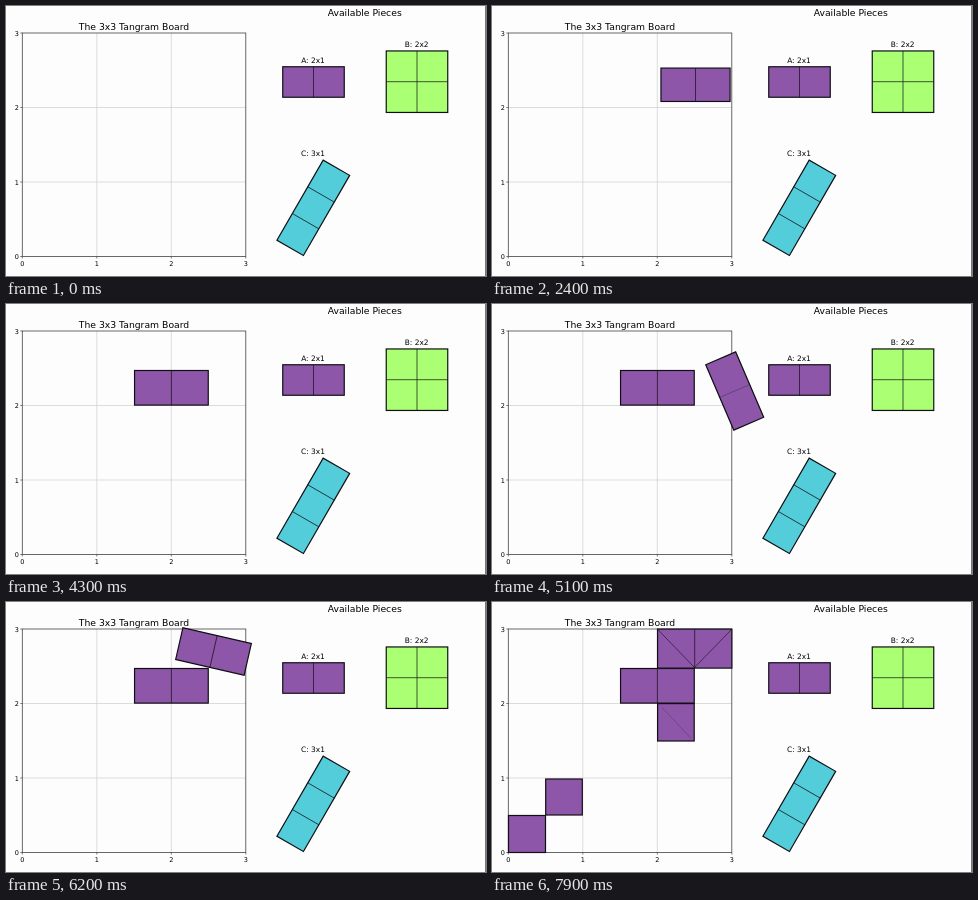
These frames come from a looping animation (480 px wide and 270 px high, 8 s). An HTML page:

```html
<!DOCTYPE html>
<html lang="en">
<head>
<meta charset="utf-8">
<title>Tangram board</title>
<style>
html, body { margin: 0; width: 100%; height: 100%; overflow: hidden; background: #fdfdfd; }
svg { display: block; width: 100vw; height: 100vh; }
text { font-family: "DejaVu Sans", sans-serif; fill: #000; text-anchor: middle; }
</style>
</head>
<body>
<svg id="stage" viewBox="0 0 480 270"></svg>
<script>
const stage = document.getElementById('stage');
const PURPLE = '#8e56a9', LIME = '#aaff72', CYAN = '#52cdd9', INK = '#101014';

function add(tag, attrs, parent = stage) {
  const el = document.createElementNS('http://www.w3.org/2000/svg', tag);
  for (const k in attrs) el.setAttribute(k, attrs[k]);
  return parent.appendChild(el);
}
function label(s, x, y, size) {
  add('text', { x, y, 'font-size': size }).textContent = s;
}
function line(x1, y1, x2, y2, stroke = INK, width = 0.7, parent = stage) {
  return add('line', { x1, y1, x2, y2, stroke, 'stroke-width': width }, parent);
}

// A block centred on its own origin, placed by cx, cy, w, h and angle.
function block(fill, cols = 1, rows = 1) {
  const g = add('g', {});
  const box = add('rect', { fill, stroke: INK, 'stroke-width': 1.2 }, g);
  const inner = add('path', { fill: 'none', stroke: INK, 'stroke-width': 0.7 }, g);
  return {
    g, inner,
    place(cx, cy, w, h, angle = 0) {
      g.setAttribute('transform', `translate(${cx} ${cy}) rotate(${angle})`);
      const size = { x: -w / 2, y: -h / 2, width: w, height: h };
      for (const k in size) box.setAttribute(k, size[k]);
      let d = '';
      for (let i = 1; i < cols; i++) d += `M${w * (i / cols - 0.5)} ${-h / 2}v${h}`;
      for (let i = 1; i < rows; i++) d += `M${-w / 2} ${h * (i / rows - 0.5)}h${w}`;
      inner.setAttribute('d', d);
      return this;
    }
  };
}

// Board
for (let i = 0; i < 4; i++) {
  const x = 16.3 + 74.5 * i, y = 250.5 - 74.5 * i;
  if (i % 3) {
    line(x, 27, x, 250.5, '#cfcfcf');
    line(16.3, y, 240, y, '#cfcfcf');
  }
  line(x, 250.5, x, 252.5, '#444');
  line(14.3, y, 16.3, y, '#444');
  label(i, x, 259.5, 6.5);
  label(i, 10.8, y + 2.5, 6.5);
}
add('rect', { x: 16.3, y: 27, width: 223.5, height: 223.5, fill: 'none', stroke: '#444', 'stroke-width': 0.8 });
line(479.5, 0, 479.5, 270, '#777', 1);

// Tray
label('The 3x3 Tangram Board', 128, 24, 9.25);
label('Available Pieces', 358.7, 10, 9.25);
label('A: 2x1', 307, 56.5, 7.45);
label('B: 2x2', 410.7, 41, 7.45);
label('C: 3x1', 307, 150, 7.45);
block(PURPLE, 2).place(307.5, 76, 61.5, 30.5);
block(LIME, 2, 2).place(411, 75.7, 61.5, 61.5);
block(CYAN, 3).place(307.3, 201.8, 92.5, 30.6, -60);

// Keys: time, cx, cy, w, h, angle
const first = block(PURPLE, 2), second = block(PURPLE, 2);
const firstKeys = [
  [700, 307.5, 76, 61.5, 30.5, 0],
  [2500, 202.6, 78.8, 69.2, 33.4, 0],
  [3200, 202.6, 78.8, 69.2, 33.4, 0],
  [4300, 165.4, 83.8, 73.7, 34.6, 0]
];
const secondKeys = [
  [4400, 307.5, 76, 61.5, 30.5, 0],
  [5450, 220.2, 90.8, 74.5, 33.3, 90],
  [5500, 220.2, 90.8, 74.5, 33.3, 90],
  [6420, 205.4, 42.6, 69.5, 32.4, 0],
  [6900, 202.7, 46.6, 74.3, 39, 0]
];

// Single cells and diagonals: appear time, then shape
const late = [];
function cell(time, cx, cy, w, h) {
  const b = block(PURPLE).place(cx, cy, w, h);
  late.push([time, b.g]);
  return b.g;
}
const lower = cell(6900, 183.9, 120.3, 36.6, 37.4);
line(-14, -15, 15, 16, '#4b2a60', 0.4, lower);
cell(7300, 72, 195, 36.6, 36);
cell(7550, 35, 232, 37, 37);
late.push([7300, line(165.8, 27.5, 202.5, 65.5, INK, 0.6)]);
late.push([7300, line(202.5, 65.5, 239.5, 27.5, INK, 0.6)]);

const clamp = u => Math.max(0, Math.min(1, u));
const smooth = u => u * u * (3 - 2 * u);

function pose(keys, t) {
  let i = 0;
  while (i < keys.length - 2 && t >= keys[i + 1][0]) i++;
  const a = keys[i], b = keys[i + 1];
  const e = smooth(clamp((t - a[0]) / (b[0] - a[0])));
  return a.slice(1).map((v, k) => v + (b[k + 1] - v) * e);
}
function show(piece, keys, t) {
  const p = pose(keys, t);
  piece.place(...p);
  piece.g.setAttribute('visibility', t < keys[0][0] ? 'hidden' : 'visible');
  piece.inner.setAttribute('opacity', clamp((90 - p[4]) / 60));
}

function draw(now) {
  const t = now % 8000;
  show(first, firstKeys, t);
  show(second, secondKeys, t);
  for (const [time, el] of late) el.setAttribute('opacity', clamp((t - time) / 200));
  requestAnimationFrame(draw);
}
draw(performance.now());
</script>
</body>
</html>
```
